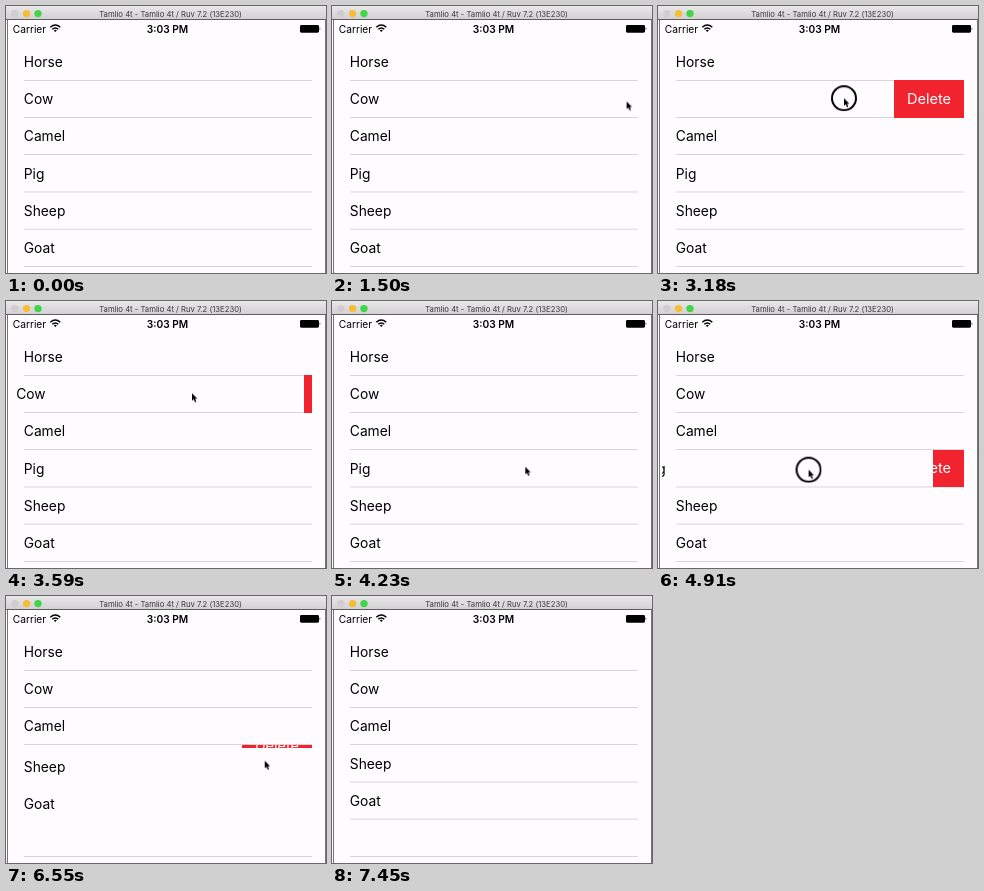
An HTML page for the animation above (9.19 s loop, 320x267 px).

```html
<!DOCTYPE html>
<html lang="en">
<head>
<meta charset="utf-8">
<title>Swipe to delete</title>
<style>
  @property --cow { syntax: "<length>"; inherits: true; initial-value: 0px; }
  @property --pig { syntax: "<length>"; inherits: true; initial-value: 0px; }

  html, body { margin: 0; width: 100%; height: 100%; overflow: hidden; background: #fefcff; }
  #stage {
    position: relative; width: 320px; height: 267px; overflow: hidden;
    font: 13.8px Inter, "Liberation Sans", sans-serif;
    animation: swipe-cow 9190ms linear infinite, swipe-pig 9190ms linear infinite;
  }
  svg { position: absolute; left: 0; top: 0; }
  .lines { stroke: #d7d5d9; fill: none; }
  .status { font-size: 10.2px; }
  .time { font-weight: 600; }
  .title { font-size: 7.7px; fill: #3a393c; text-anchor: middle; }

  .cow { transform: translateX(calc(-1 * var(--cow))); }
  .pig { transform: translateX(calc(-1 * var(--pig))); }
  .below { animation: rise 9190ms linear infinite; }
  .inner { animation: inner 9190ms step-end infinite; }

  .delete {
    position: absolute; right: 14px; height: 37.2px; overflow: hidden;
    background: #f0232f; color: #fff; font-size: 14.6px;
  }
  .delete span {
    position: absolute; right: 0; top: 50%; width: 70px;
    line-height: 18px; margin-top: -9px; text-align: center;
  }
  #delete-cow { top: 74.4px; width: var(--cow); }
  #delete-pig {
    top: 148.8px; width: var(--pig);
    animation: collapse 9190ms linear infinite, press 9190ms step-end infinite;
  }

  #pointer { animation: move 9190ms linear infinite, show 9190ms step-end infinite; }
  #ring { animation: touch 9190ms step-end infinite; }

  @keyframes swipe-cow {
    0%, 22.09% { --cow: 0px; }
    23.29% { --cow: 18px; }
    24.2% { --cow: 40px; animation-timing-function: ease-out; }
    27.1% { --cow: 70px; }
    35.91% { --cow: 70px; animation-timing-function: ease-out; }
    40.26%, 100% { --cow: 0px; }
  }
  @keyframes swipe-pig {
    0%, 50.27% { --pig: 0px; }
    54.41% { --pig: 40px; animation-timing-function: ease-out; }
    58.87%, 100% { --pig: 70px; }
  }
  @keyframes rise {
    0% { transform: none; }
    67.79% { transform: none; animation-timing-function: ease-in-out; }
    72.15%, 100% { transform: translateY(-37.2px); }
  }
  @keyframes collapse {
    0% { height: 37.2px; }
    67.79% { height: 37.2px; animation-timing-function: ease-in-out; }
    72.15%, 100% { height: 0; }
  }
  @keyframes press {
    0%, 67.79%, 100% { background: #f0232f; }
    64.74% { background: #d5202b; }
  }
  @keyframes inner {
    0%, 73.6%, 100% { opacity: 1; }
    67.79% { opacity: 0; }
  }
  @keyframes move {
    0%, .98% { transform: translate(16.5px, 84px); }
    3% { transform: translate(168px, 3.5px); }
    16.3% { transform: translate(295px, 95.5px); }
    19.26%, 21.22% { transform: translate(259.5px, 95.5px); }
    23.29% { transform: translate(200.5px, 92.7px); }
    25.03%, 40.4% { transform: translate(186px, 92.2px); }
    44.5% { transform: translate(193px, 144.5px); }
    46.03% { transform: translate(193.3px, 165.7px); }
    47.01%, 48.97% { transform: translate(190px, 172px); }
    54.41%, 59.3% { transform: translate(142px, 168px); }
    62.79%, 78.13% { transform: translate(258.7px, 164.7px); }
    80.98%, 100% { transform: translate(308px, 164.7px); }
  }
  @keyframes show {
    0%, 3.48%, 80.98%, 100% { opacity: 0; }
    .98%, 16.32% { opacity: 1; }
  }
  @keyframes touch {
    0%, 25.03%, 35.91%, 54.41%, 66.81%, 100% { opacity: 0; }
    21.22%, 34.55%, 48.97%, 64.74% { opacity: 1; }
  }
</style>
</head>
<body>
<div id="stage">
  <svg width="320" height="267">
    <defs>
      <linearGradient id="bar" x2="0" y2="1">
        <stop stop-color="#e9e7e9"/>
        <stop offset="1" stop-color="#d3d1d3"/>
      </linearGradient>
      <clipPath id="table"><path d="M4 30H306V267H4Z"/></clipPath>
    </defs>

    <rect width="320" height="267" fill="#fefcff"/>
    <rect width="320" height="13" fill="url(#bar)"/>
    <path d="M0 13.5H320" stroke="#5f5d61"/>
    <path d="M1.5 14V267M319.5 14V267" stroke="#77757a"/>
    <circle cx="8.8" cy="7.6" r="3.7" fill="#cfcdcf"/>
    <circle cx="20.6" cy="7.6" r="3.7" fill="#f6bd35"/>
    <circle cx="32" cy="7.6" r="3.7" fill="#3fd648"/>
    <text class="title" x="164.5" y="10.6">Tamlio 4t - Tamlio 4t / Ruv 7.2 (13E230)</text>

    <g class="status">
      <text x="6.8" y="26.5">Carrier</text>
      <text class="time" x="161.5" y="26.5" text-anchor="middle">3:03 PM</text>
    </g>
    <g fill="none" stroke="#000" stroke-width="1.5">
      <path d="M44.3 21.2Q49.3 16.8 54.3 21.2M46.3 23.3Q49.3 20.6 52.3 23.3"/>
      <path d="M47.8 24.4Q49.3 23.2 50.8 24.4L49.3 26Z" fill="#000" stroke="none"/>
    </g>
    <rect x="294" y="18.9" width="19" height="7.8" rx="1.4"/>
    <path d="M313.7 21.3Q315.2 22.8 313.7 24.3Z"/>

    <path class="lines" d="M18 74.5H306M18 111.5H306M18 148.5H306M18 260.5H306"/>
    <path class="lines inner" d="M18 186H306M18 223.2H306"/>

    <g clip-path="url(#table)">
      <text x="17.8" y="61">Horse</text>
      <text class="cow" x="17.8" y="98.2">Cow</text>
      <text x="17.8" y="135.4">Camel</text>
      <text class="pig" x="17.8" y="172.6">Pig</text>
      <g class="below">
        <text x="17.8" y="209.8">Sheep</text>
        <text x="17.8" y="247">Goat</text>
      </g>
    </g>
  </svg>

  <div class="delete" id="delete-cow"><span>Delete</span></div>
  <div class="delete" id="delete-pig"><span>Delete</span></div>

  <svg width="320" height="267">
    <g id="pointer">
      <circle id="ring" r="12" fill="none" stroke="#000" stroke-width="2"/>
      <path d="M0 0V7.6L1.7 6 3 9 4.3 8.4 3.1 5.5H5.4Z" stroke="#fff" stroke-width=".8" paint-order="stroke"/>
    </g>
  </svg>
</div>
</body>
</html>
```
